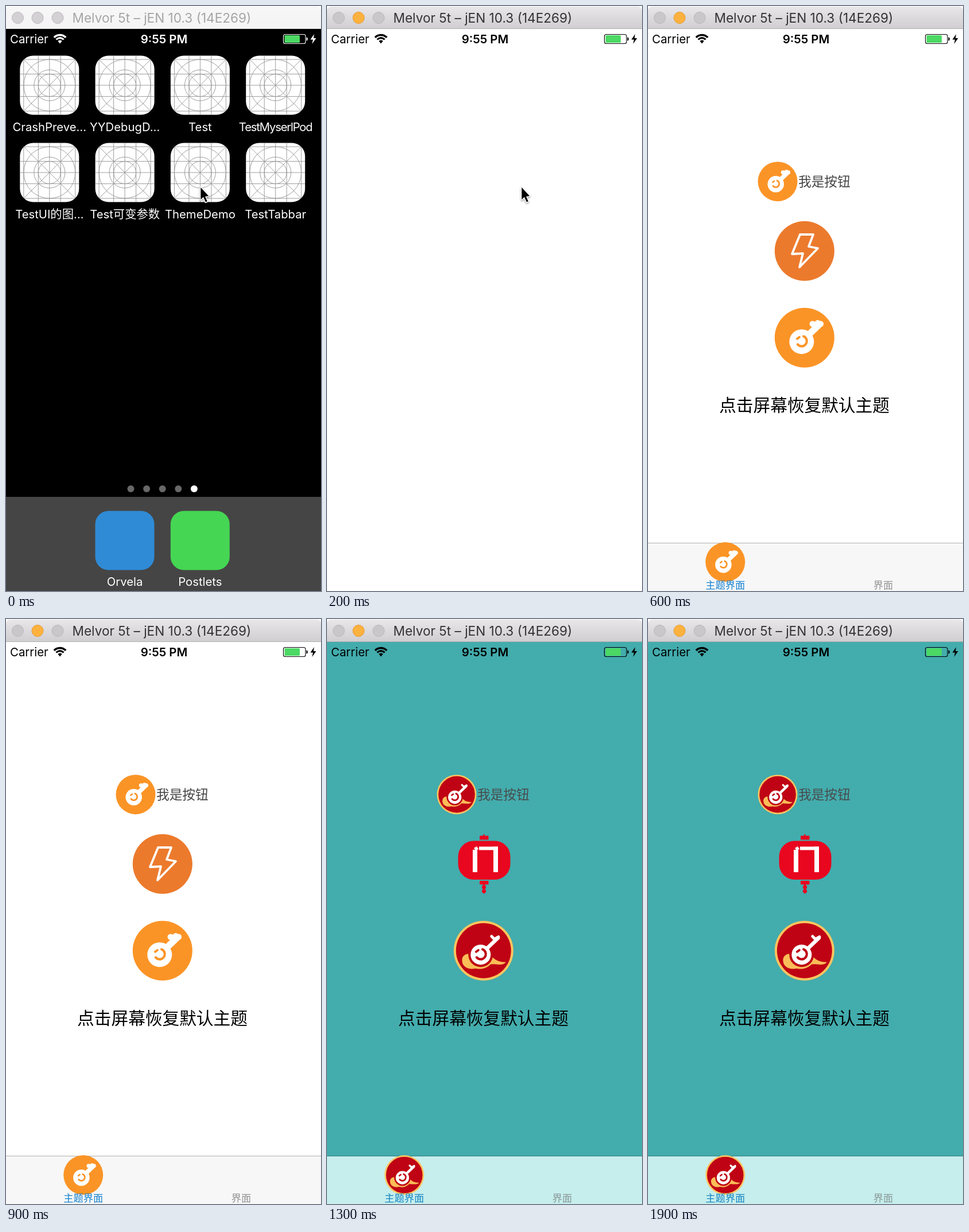
Recreate the animation shown at these times as an HTML page with a canvas. Size 549 by 1019 pixels, loop 2 s.

```html
<!DOCTYPE html>
<html lang="en">
<head>
<meta charset="utf-8">
<title>Theme demo</title>
<style>
html, body { margin: 0; width: 100%; height: 100%; overflow: hidden; background: #fff; }
canvas { display: block; }
</style>
</head>
<body>
<canvas id="stage" width="549" height="1019"></canvas>
<script>
const W = 549, H = 1019, LOOP = 2000, STEP = 100;
const ctx = document.getElementById('stage').getContext('2d');
const LATIN = 'Inter, "Noto Sans CJK SC", "Noto Sans CJK", sans-serif';
const HAN = '"Noto Sans CJK SC", "Noto Sans CJK", sans-serif';

const apps = ['CrashPreve…', 'YYDebugD…', 'Test', 'TestMyserlPod',
              'TestUI的图…', 'Test可变参数', 'ThemeDemo', 'TestTabbar'];

const plain = { back: '#fff', bar: '#f7f7f7', line: '#b2b2b2', label: '#444', tab: '#1481d0', idle: '#929292' };
const festive = { back: '#43acad', bar: '#c5eeed', line: '#347f80', label: '#484b4c', tab: '#1585c2', idle: '#8b9797', red: true };

// Helpers

function box(x, y, w, h, r, fill) {
  ctx.beginPath();
  ctx.roundRect(x, y, w, h, r);
  ctx.fillStyle = fill;
  ctx.fill();
}

function disc(x, y, r, fill) {
  ctx.beginPath();
  ctx.arc(x, y, r, 0, Math.PI * 2);
  ctx.fillStyle = fill;
  ctx.fill();
}

function poly(points, closed = true) {
  ctx.beginPath();
  points.forEach(([x, y]) => ctx.lineTo(x, y));
  if (closed) ctx.closePath();
}

function stroke(color, width) {
  ctx.strokeStyle = color;
  ctx.lineWidth = width;
  ctx.stroke();
}

function text(str, x, y, size, color, { align = 'left', weight = 400, family = LATIN, spacing = 0 } = {}) {
  ctx.font = `${weight} ${size}px ${family}`;
  ctx.letterSpacing = spacing + 'px';
  ctx.textAlign = align;
  ctx.fillStyle = color;
  ctx.fillText(str, x, y);
}

function placed(x, y, sx, sy, draw) {
  ctx.save();
  ctx.translate(x, y);
  ctx.scale(sx, sy);
  draw();
  ctx.restore();
}

function backdrop(color) {
  ctx.fillStyle = color;
  ctx.fillRect(0, 40, W, H - 40);
}

// Window frame and status bar

function titleBar(active) {
  const g = ctx.createLinearGradient(0, 0, 0, 39);
  g.addColorStop(0, active ? '#e9e7e9' : '#f7f7f7');
  g.addColorStop(1, active ? '#d0ced0' : '#f4f4f4');
  ctx.fillStyle = '#fff';
  ctx.fillRect(0, 0, W, 40);
  box(0, 1, W, 39, [7, 7, 0, 0], g);
  ctx.fillStyle = active ? '#b1afb1' : '#d5d5d5';
  ctx.fillRect(0, 39, W, 1);
  [20.5, 55, 90].forEach((x, i) => {
    const lit = active && i === 1;
    disc(x, 20.5, 10, lit ? '#fdb13f' : active ? '#cac7ca' : '#d4d1d4');
    stroke(lit ? '#e79b31' : '#b9b6b9', 1);
  });
  text('Melvor 5t – jEN 10.3 (14E269)', 115.5, 29, 22.6, active ? '#333' : '#a5a5a5');
}

function statusBar(color) {
  text('Carrier', 7, 65, 20.4, color);
  text('9:55 PM', 275.5, 65, 20.4, color, { align: 'center', weight: 600 });

  [[14, 3.4], [8.8, 3.2]].forEach(([r, w]) => {
    ctx.beginPath();
    ctx.arc(94, 64.5, r, -Math.PI * 0.76, -Math.PI * 0.24);
    stroke(color, w);
  });
  ctx.beginPath();
  ctx.moveTo(94, 65.5);
  ctx.arc(94, 64.5, 5, -Math.PI * 0.76, -Math.PI * 0.24);
  ctx.fillStyle = color;
  ctx.fill();

  ctx.beginPath();
  ctx.roundRect(483.5, 49.5, 38.5, 16, 3);
  stroke(color, 1.1);
  box(485.5, 51, 26.5, 13, 1.5, '#4cd964');
  box(523.5, 54.5, 2.2, 6, [0, 2, 2, 0], color);
  poly([[537, 49], [530.5, 58.5], [535, 58.5], [533.5, 66], [540.5, 56], [536, 56]]);
  ctx.fillStyle = color;
  ctx.fill();
}

function cursor() {
  poly([[339.3, 316], [339.3, 337.2], [344, 332.8], [347.9, 341.6], [350.8, 340.3], [347.1, 331.7], [353.2, 331]]);
  ctx.save();
  ctx.shadowColor = 'rgba(0,0,0,.4)';
  ctx.shadowBlur = 3;
  ctx.shadowOffsetY = 1.5;
  stroke('#fff', 3);
  ctx.restore();
  ctx.fillStyle = '#000';
  ctx.fill();
}

// Home screen

function guides(color, width) {
  const c = 51.5;
  ctx.beginPath();
  for (const d of [-45, -19.5, 0, 19.5, 45]) {
    ctx.moveTo(c + d, 0);
    ctx.lineTo(c + d, 103);
    ctx.moveTo(0, c + d);
    ctx.lineTo(103, c + d);
  }
  ctx.moveTo(4, 4);
  ctx.lineTo(99, 99);
  ctx.moveTo(99, 4);
  ctx.lineTo(4, 99);
  for (const r of [19.5, 27, 45]) {
    ctx.moveTo(c + r, c);
    ctx.arc(c, c, r, 0, Math.PI * 2);
  }
  stroke(color, width);
}

function homeScreen() {
  apps.forEach((name, i) => {
    const x = 24.3 + (i % 4) * 131.3, y = 86.6 + Math.floor(i / 4) * 152;
    placed(x, y, 1, 1, () => {
      box(0, 0, 103, 103, 23, '#fff');
      ctx.save();
      ctx.clip();
      guides('#929292', 0.9);
      ctx.restore();
    });
    text(name, x + 51.5, y + 131.3, 20.3, '#fff',
         { align: 'center', spacing: name === 'TestMyserlPod' ? -1.2 : 0 });
  });
  for (let i = 0; i < 5; i++) disc(217.5 + i * 27.6, 841, 6, i === 4 ? '#fff' : '#686868');
  ctx.fillStyle = '#454545';
  ctx.fillRect(0, 855, W, 164);
  [['Orvela', 155.5, '#2f8bd6'], ['Postlets', 286.8, '#45d653']].forEach(([name, x, color]) => {
    box(x, 879.5, 103, 103, 23, color);
    text(name, x + 51.5, 1010, 20.3, '#fff', { align: 'center' });
  });
}

function idleHome() {
  backdrop('#000');
  homeScreen();
  statusBar('#fff');
  titleBar(false);
  cursor();
}

function opening() {
  backdrop('#000');
  placed(-113.8, -98.3, 1.336, 1.336, homeScreen);
  backdrop('rgba(0,0,0,.12)');
  ctx.globalAlpha = 0.8;
  statusBar('#fff');
  ctx.globalAlpha = 1;

  box(237.5, 205, 179.5, 263, 7, '#e2e0e1');
  placed(237.5, 205, 179.5 / 103, 263 / 103, () => guides('#d8d6d7', 0.6));
  placed(237.5, 191.5, 0.327, 0.327, () => statusBar('#000'));
  titleBar(true);
  cursor();
}

function launchScreen() {
  backdrop('#fff');
  statusBar('#000');
  titleBar(true);
  cursor();
}

// App screen

function cloud() {
  ctx.beginPath();
  ctx.moveTo(-37, 20);
  ctx.bezierCurveTo(-40, 8, -28, 4, -24, 6);
  ctx.bezierCurveTo(-22, -10, -2, -12, 4, 4);
  ctx.bezierCurveTo(18, 8, 16, 20, 39, 20);
  ctx.bezierCurveTo(32, 28, 20, 22, 12, 24);
  ctx.bezierCurveTo(2, 34, -10, 32, -14, 31);
  ctx.bezierCurveTo(-26, 34, -36, 28, -37, 20);
  ctx.fillStyle = '#fbbd58';
  ctx.fill();
}

function keyIcon(x, y, r, theme) {
  const back = theme.red ? '#bf0314' : '#fb9426';
  placed(x, y, r / 52, r / 52, () => {
    ctx.lineCap = 'round';
    disc(0, 0, 52, theme.red ? '#fdc55f' : back);
    if (theme.red) {
      disc(0, 0, 48, back);
      cloud();
      disc(-5, 7, 21.5, back);
      poly([[14, -25], [19, -20], [26, -24]], false);
      stroke('#fff', 5);
    } else {
      [[14, -24], [23, -25.5], [28, -24]].forEach(([dx, dy]) => disc(dx, dy, 5.3, '#fff'));
    }
    poly([[4, -2], [25, -22]], false);
    stroke('#fff', theme.red ? 6.5 : 11.5);
    disc(-5, 7, theme.red ? 17.5 : 21.5, '#fff');
    ctx.beginPath();
    ctx.arc(-5, 6, 9, -Math.PI * 0.38, Math.PI * 0.78);
    stroke(back, 4.2);
    poly([[-13, 2], [-9, -1]], false);
    stroke(back, 3.8);
  });
}

function boltIcon() {
  disc(272.8, 426.7, 52, '#ec7a2c');
  poly([[265, 398], [288, 398], [280, 419], [296, 422], [264, 455], [270, 431], [251, 432]]);
  stroke('#fff', 3.8);
}

function lanternIcon() {
  const red = '#e9061f';
  box(272.2, 375, 2.2, 6, 0, red);
  box(266, 377.5, 15.5, 7, 1, red);
  box(228.5, 386.5, 91, 67.5, 27, red);
  box(266, 456, 15.5, 6.5, 1, red);
  box(272, 462, 3, 16, 0, red);
  [467, 474].forEach(y => disc(273.5, y, 3.6, red));
  ctx.fillStyle = '#fff';
  ctx.fillRect(254, 402, 8, 39);
  ctx.fillRect(265, 396.5, 33, 6);
  ctx.fillRect(290, 396.5, 8, 44.5);
  poly([[256, 399], [261, 396], [264, 401], [259, 403]]);
  ctx.fill();
}

function appScreen(theme) {
  const han = { family: HAN, weight: 300 }, mid = { ...han, align: 'center' };
  backdrop(theme.back);
  statusBar('#000');
  titleBar(true);

  ctx.fillStyle = theme.bar;
  ctx.fillRect(0, 936, W, H - 936);
  ctx.fillStyle = theme.line;
  ctx.fillRect(0, 935, W, 1);

  keyIcon(226, 305.7, 34.5, theme);
  text('我是按钮', 262, 313.8, 22.7, theme.label, han);
  theme.red ? lanternIcon() : boltIcon();
  keyIcon(272.8, 577.7, 52, theme);
  text('点击屏幕恢复默认主题', 272.5, 705.5, 29.7, '#000', mid);
  keyIcon(134.7, 968.5, 34.5, theme);
  text('主题界面', 134.7, 1014.7, 17.2, theme.tab, mid);
  text('界面', 410, 1014.7, 17.2, theme.idle, mid);
}

// Playback

const opened = [idleHome, opening, launchScreen];
const THEME_CHANGE = 13;

function draw(time) {
  const step = Math.floor((time % LOOP) / STEP);
  ctx.lineCap = 'butt';
  ctx.lineJoin = 'round';
  if (step < opened.length) opened[step]();
  else appScreen(step < THEME_CHANGE ? plain : festive);
}

function play() {
  draw(performance.now());
  requestAnimationFrame(play);
}
play();
</script>
</body>
</html>
```
